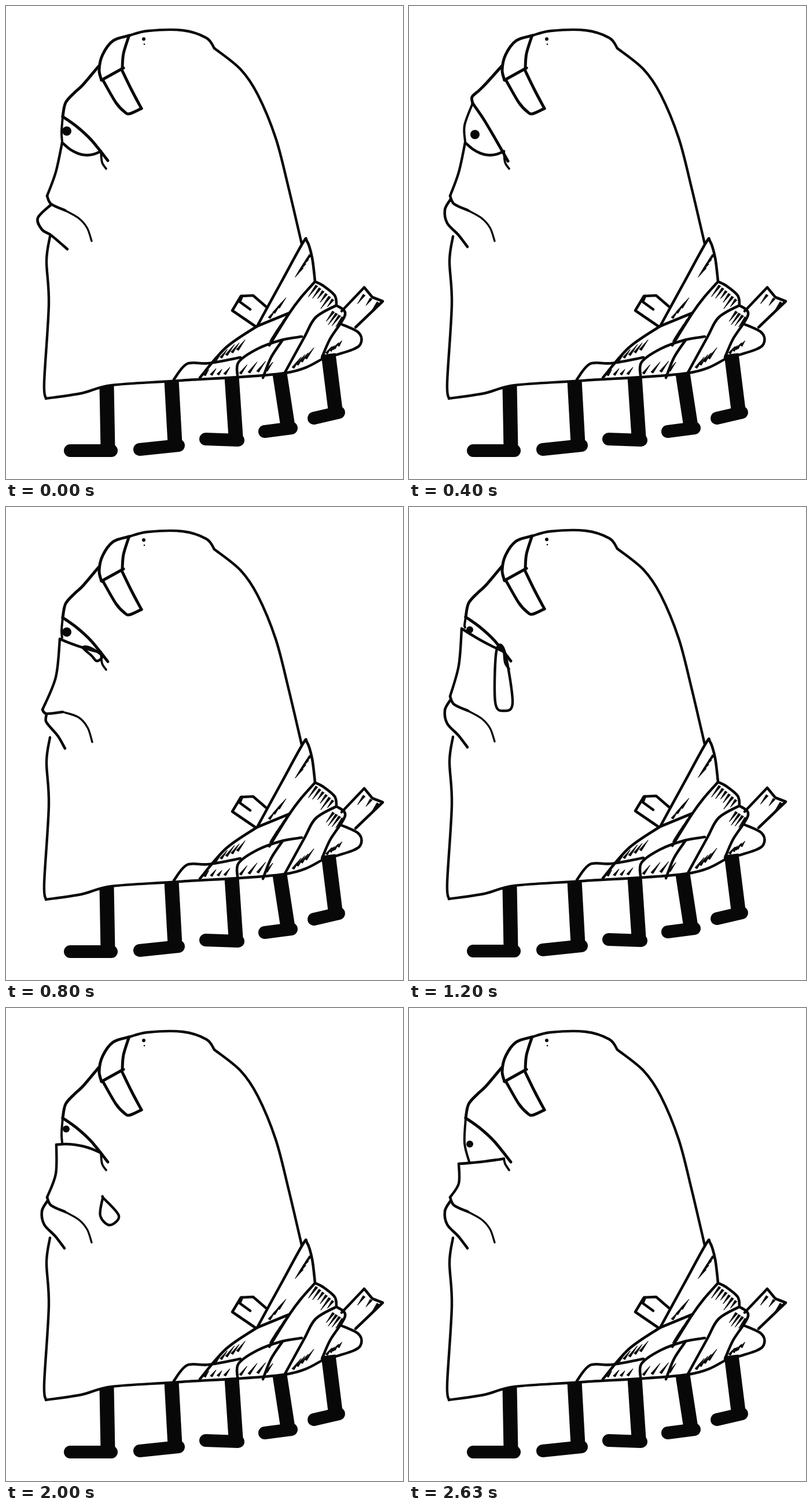
An HTML page with a canvas for the animation above (2.76 s loop, 686 by 817 pixels).

```html
<!DOCTYPE html>
<html lang="en">
<head>
<meta charset="utf-8">
<title>Sad creature</title>
<style>
html, body { margin: 0; width: 100%; height: 100%; overflow: hidden; background: #fff; }
canvas { display: block; }
</style>
</head>
<body>
<canvas id="stage" width="686" height="817"></canvas>
<script>
const ctx = document.getElementById('stage').getContext('2d');
const LOOP = 2760;
const INK = '#080808';

const pts = text => text.split(' ').map(pair => pair.split(',').map(Number));
const noise = i => Math.abs(Math.sin(i * 12.9898) * 43758.5453) % 1;

// Interpolates numbers and nested arrays or objects of numbers
function mix(a, b, t) {
  if (typeof a === 'number') return a + (b - a) * t;
  if (Array.isArray(a)) return a.map((v, i) => mix(v, b[i], t));
  return Object.fromEntries(Object.keys(a).map(k => [k, mix(a[k], b[k], t)]));
}

// Smooth curve through every point
function curve(points, width = 4.6, closed = false) {
  const n = points.length;
  const at = i => points[closed ? (i + n) % n : Math.max(0, Math.min(n - 1, i))];
  ctx.beginPath();
  ctx.moveTo(...points[0]);
  for (let i = 0; i < (closed ? n : n - 1); i++) {
    const [a, b, c, d] = [at(i - 1), at(i), at(i + 1), at(i + 2)];
    ctx.bezierCurveTo(
      b[0] + (c[0] - a[0]) / 6, b[1] + (c[1] - a[1]) / 6,
      c[0] - (d[0] - b[0]) / 6, c[1] - (d[1] - b[1]) / 6, ...c);
  }
  ctx.lineWidth = width;
  ctx.stroke();
}

function line(points, width = 4.6) {
  ctx.beginPath();
  points.forEach(p => ctx.lineTo(...p));
  ctx.lineWidth = width;
  ctx.stroke();
}

function dot(x, y, r) {
  ctx.beginPath();
  ctx.arc(x, y, r, 0, Math.PI * 2);
  ctx.fill();
}

const contour = [
  '213,51 245,43 305,42 346,55 360,73',
  '360,73 405,109 435,153 466,228 488,313 511,411',
  '76,398 70,440 74,515 66,650 69,678',
  '69,678 130,669 183,655 300,647 482,634 548,609'
].map(pts);

const bandage = [
  '213,51 185,60 167,84 161,110 165,128',
  '212,53 203,82 201,106',
  '165,128 203,107',
  '168,129 190,167 205,183 214,186 234,177',
  '200,110 217,145 234,177'
].map(pts);

const planks = [
  '432,554 391,526 406,501 427,500 449,519',
  '580,527 619,486 633,503 651,510 604,555',
  '422,524 404,511 408,501'
].map(pts);

const wraps = [
  '434,553 475,478 513,409 520,406 529,435 534,476',
  '534,476 548,483 568,500 571,517',
  '534,476 510,503 490,530 455,586',
  '434,553 490,530',
  '434,553 380,590 335,642',
  '571,517 535,538 515,573 482,633',
  '571,517 586,533 560,575 546,607',
  '578,549 608,563 614,580 600,593 548,609',
  '290,645 313,618 350,617 405,607',
  '400,639 402,615 435,592 476,577 511,571',
  '444,642 458,607 478,577'
].map(pts);

// Rows of brush marks: from x,y  to x,y  count,length (negative points up)
const grain = [
  '526,430 512,452 4,24', '471,521 455,539 3,-24', '537,483 565,507 6,24',
  '488,533 470,560 4,28', '362,612 400,594 5,-22', '566,528 582,538 4,22',
  '496,625 518,609 4,-20', '554,600 574,587 4,-14', '405,635 450,630 4,-20',
  '343,638 378,636 4,-16', '619,499 643,512 3,18'
].map(pts);

// Hip, ankle, heel and toe
const legs = [
  '174,657 176,765 182,768 111,768',
  '286,647 292,756 298,759 231,766',
  '390,640 397,744 401,750 345,748',
  '473,635 487,726 493,729 447,735',
  '557,601 569,697 575,702 532,712'
].map(pts);

const brow = [pts('160,104 133,136 119,149 103,167 98,191'),
              pts('160,104 133,134 121,146 109,157 110,168')];
const lid = [pts('98,191 122,208 147,231 176,267'),
             pts('110,168 128,194 146,224 171,268')];
const cheek = [pts('71,328 78,342 102,353 125,366 140,383 148,406'),
               pts('63,350 70,357 98,354 125,363 141,381 149,406')];
const lip = pts('71,335 62,352 66,375 85,395 101,416');
const pout = pts('78,343 55,366 62,386 78,396 106,420');
const sunkLip = pts('70,358 69,370 78,382 90,396 102,417');

// corner, sag: lower eyelid; tear: top x, y, half width, then bottom x, y, half width
const calm = { frown: 0, pout: 0, droop: 0, corner: [97, 236], sag: 13,
  pupil: [105, 216, 8], tear: [148, 245, 0, 148, 255, 0] };
const welling = { ...calm, droop: 1, corner: [93, 228], sag: 2,
  tear: [139, 243, 6, 157, 266, 9] };
const weeping = { ...calm, corner: [91, 211], sag: 2,
  pupil: [105, 213, 6], tear: [158, 250, 7, 164, 353, 15] };
const keys = [
  [0, { ...calm, pout: 1 }],
  [400, { ...calm, frown: 1, pupil: [114, 222, 8] }],
  [800, welling],
  [1000, { ...mix(welling, weeping, .6), droop: 0 }],
  [1200, weeping],
  [1400, weeping],
  [2000, { ...calm, corner: [87, 237], sag: -6,
    pupil: [104, 210, 6], tear: [168, 330, 1, 179, 376, 16] }],
  [2370, { ...calm, corner: [82, 261], sag: 0,
    pupil: [107, 224, 6], tear: [180, 363, 9, 181, 377, 12] }],
  [2630, { ...calm, corner: [86, 270], sag: 1,
    pupil: [105, 236, 6], tear: [181, 370, 0, 181, 372, 0] }]
];

function poseAt(time) {
  const next = keys.findIndex(key => key[0] > time);
  if (next < 0) return keys[keys.length - 1][1];
  const [[t0, a], [t1, b]] = [keys[next - 1], keys[next]];
  return mix(a, b, (time - t0) / (t1 - t0));
}

function drawGrain() {
  let seed = 1;
  for (const [from, to, [count, length]] of grain) {
    for (let i = 0; i < count; i++) {
      const [x, y] = mix(from, to, i / (count - 1));
      const reach = length * (.65 + .5 * noise(seed++));
      ctx.beginPath();
      ctx.moveTo(x - 1.7, y - 1);
      ctx.lineTo(x + 1.7, y + 1);
      ctx.lineTo(x - reach * .6, y + reach * .8);
      ctx.closePath();
      ctx.lineWidth = 1;
      ctx.stroke();
      ctx.fill();
    }
  }
}

function drawBody() {
  contour.forEach(points => curve(points, 4.4));
  bandage.forEach(points => curve(points, 5));
  planks.forEach(points => line(points));
  wraps.forEach(points => curve(points));
  drawGrain();
  for (const [hip, ankle, heel, toe] of legs) {
    ctx.lineCap = 'butt';
    line([hip, ankle], 25);
    ctx.lineCap = 'round';
    line([heel, toe], 22);
  }
  dot(238, 57, 3);
  dot(239, 66, 1.3);
  dot(565, 591, 3);
}

function drawEye({ frown, corner, sag, pupil }) {
  const [x, y] = corner;
  const opened = Math.max(0, y - 236);
  const upper = mix(...lid, frown);
  const end = [164, 251 + opened * .3];
  const lower = [0, .2, .4, .6, .8, 1].map(t => {
    const [px, py] = mix(corner, end, t);
    return [px, py + 4 * sag * t * (1 - t)];
  });
  curve(mix(...brow, frown), 5);
  curve([upper[0], [96, (upper[0][1] + y) / 2 + 4], [97 + opened * .22, y - 2]], 4);
  curve(lower);
  curve([end, [166, 270], [173, 281]], 3.8);
  dot(...pupil);
  curve(upper, 5);
}

function drawMouth({ corner, droop, pout: push }) {
  const jowl = mix(...cheek, droop);
  const nose = jowl[0];
  curve([corner, [86, (corner[1] + nose[1]) / 2 + 5], nose], 4.4);
  curve(jowl.slice(0, 3), 4.6);
  curve(jowl.slice(2), 3.4);
  curve(mix(mix(lip, pout, push), sunkLip, droop), 4.6);
}

function drawTear([tx, ty, top, bx, by, half]) {
  if (half < 1) return;
  const belly = by - Math.min(half, (by - ty) / 2);
  curve([[tx - top, ty], [bx - half, belly], [bx, by], [bx + half, belly], [tx + top, ty]], 4.4, true);
}

function draw(time) {
  const held = time < 2370 ? time - time % 200 : time - (time - 2370) % 130;
  const pose = poseAt(held);
  ctx.setTransform(1, 0, 0, 1, 0, held < 1000 ? 0 : -1);
  ctx.fillStyle = '#fff';
  ctx.fillRect(0, 0, 686, 819);
  ctx.fillStyle = ctx.strokeStyle = INK;
  ctx.lineCap = ctx.lineJoin = 'round';
  drawBody();
  drawEye(pose);
  drawMouth(pose);
  drawTear(pose.tear);
}

const start = performance.now();
function tick() {
  draw((performance.now() - start) % LOOP);
  requestAnimationFrame(tick);
}
tick();
</script>
</body>
</html>
```
